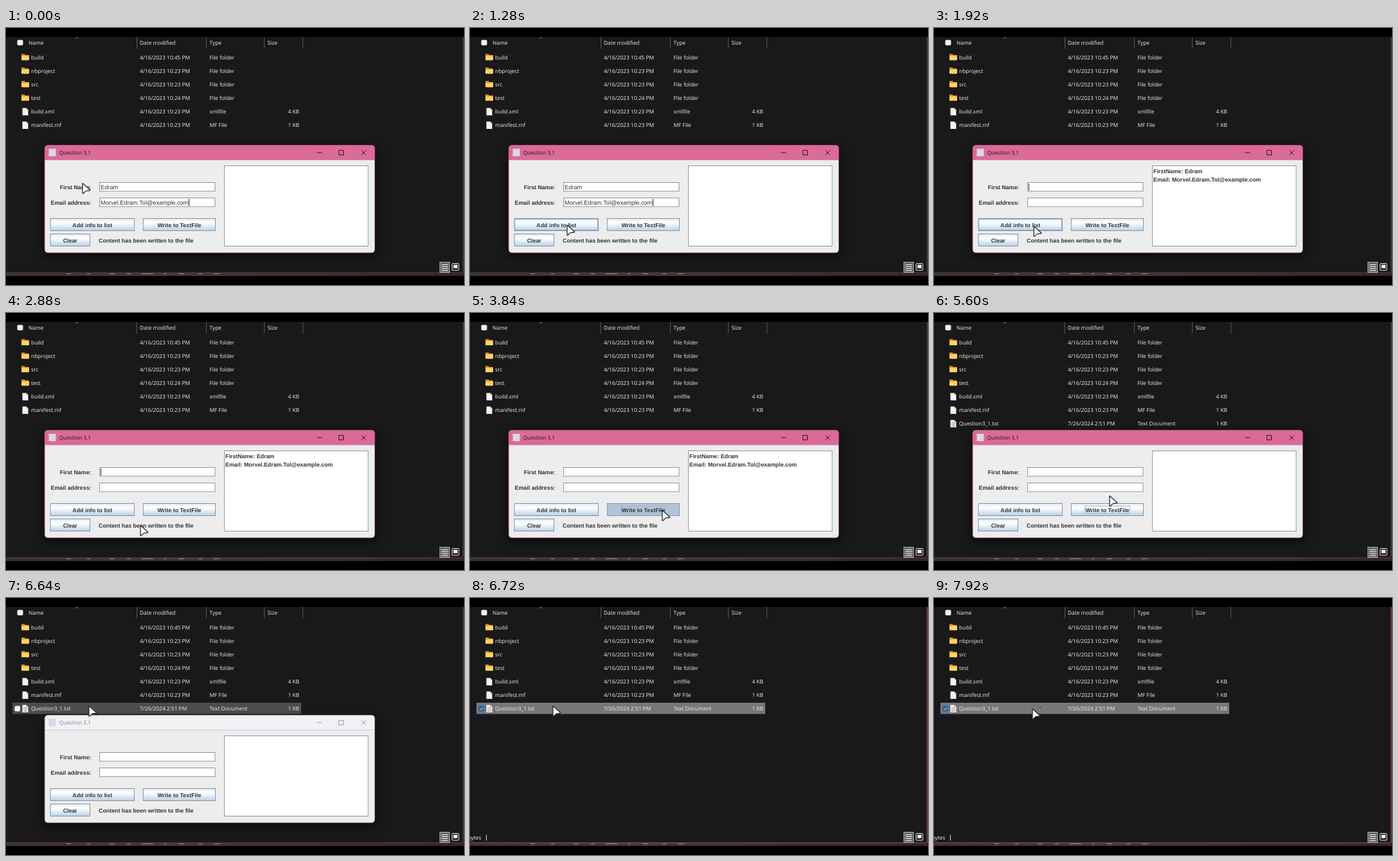
Animation, 712 px wide and 400 px high, one loop 8 s. Source, as an HTML page:

```html
<!DOCTYPE html>
<html lang="en">
<head>
<meta charset="utf-8">
<title>Question 3.1</title>
<style>
html, body { margin: 0; width: 100%; height: 100%; overflow: hidden; background: #000; }
svg { display: block; width: 712px; height: 400px; text-rendering: geometricPrecision; }
text { white-space: pre; }
.ui { font: 8.4px "Open Sans", "Noto Sans", sans-serif; fill: #f0f0f0; }
.bold { font: bold 8.85px "Liberation Sans", sans-serif; fill: #333; }
.plain { font: 9.25px "Liberation Sans", sans-serif; fill: #333; }
.end { text-anchor: end; }
.mid { text-anchor: middle; }
.line { fill: none; stroke: #8494a4; }
.field { fill: #fff; stroke: #8b959f; }
.glyph { fill: none; stroke: #2b1520; }
.frame { fill: #a04a6e; }
.bar { fill: #db6a98; }
.caption { fill: #26121c; }
.off { display: none; }
.inactive .frame { fill: #6a6a6c; }
.inactive .bar { fill: #f0f1f5; }
.inactive .caption { fill: #888b92; }
.inactive .glyph { stroke: #989aa2; }
</style>
</head>
<body>
<svg viewBox="0 0 712 400">
  <defs>
    <linearGradient id="metal" x2="0" y2="1">
      <stop offset="0" stop-color="#dde8f3"/>
      <stop offset=".3" stop-color="#fff"/>
      <stop offset=".5" stop-color="#f1f6fa"/>
      <stop offset="1" stop-color="#b8cfe5"/>
    </linearGradient>
    <linearGradient id="wall" x2="1" y2="0">
      <stop offset="0" stop-color="#3a2e38"/>
      <stop offset=".35" stop-color="#443541"/>
      <stop offset="1" stop-color="#33232f"/>
    </linearGradient>
    <filter id="soft" x="-10%" y="-20%" width="120%" height="140%"><feGaussianBlur stdDeviation="7"/></filter>
    <g id="folder">
      <path d="M24 -4.5q0-1 1-1h3.5l1.5 1.5h5q1 0 1 1v6q0 1-1 1h-10q-1 0-1-1z" fill="#d99a22"/>
      <rect x="24" y="-2.5" width="12" height="6.8" rx="1" fill="#ffd45f"/>
    </g>
    <path id="page" d="M25.5-5.5h6l3 3v8.5h-9z" fill="#f4f4f4"/>
    <path id="fold" d="M31.5-5.5v3h3z" fill="#b3b3b3"/>
    <path id="rules" d="M27-1.5h6M27 .5h6M27 2.5h6M27 4.5h6" stroke="#8d8d8d" stroke-width=".8"/>
  </defs>

  <rect y="14" width="712" height="372" fill="url(#wall)"/>
  <rect y="14" width="710" height="367" fill="#191919"/>
  <path id="edge" d="M0 381H708q2.5 0 2.5-2.5V14" fill="none"/>
  <path d="M94 382.5h7M126 382.5h5M161 382.5h8M188 382.5h6M211 382.5h18M245 382.5h4M268 382.5h9M299 382.5h6M323 382.5h9" stroke="#9b8b96"/>

  <g id="header">
    <rect x="17.5" y="18.5" width="9" height="8.5" rx="2" fill="#f2f2f2"/>
    <path d="M107.5 16.5l2.5-2.5 2.5 2.5" fill="none" stroke="#999" stroke-width=".8"/>
    <path d="M203.5 14V32M311.5 14V32M401.5 14V32M461.5 14V32" stroke="#555"/>
  </g>

  <g id="highlight">
    <rect id="rowFill" x="10" y="163" width="449" height="17.5"/>
    <rect id="box" x="13.5" y="168" width="8.5" height="8.5" rx="2"/>
    <path id="check" d="M15.5 172.3l1.7 1.7 3-3.4" fill="none" stroke="#fff"/>
  </g>
  <g id="rows"></g>

  <g id="status">
    <text class="ui end" x="17.5" y="375.8">1 item selected  68 bytes</text>
    <path d="M25.5 368.5v9" stroke="#ddd"/>
  </g>
  <rect x="674.5" y="364.5" width="15" height="16" fill="#666" stroke="#b0b0b0"/>
  <path d="M677 368.5h10M677 371.5h10M677 374.5h10M677 377.5h10" stroke="#f4f4f4"/>
  <rect x="693.5" y="366.5" width="10.5" height="10.5" rx="1" fill="#111" stroke="#f4f4f4"/>
  <rect x="695.5" y="368.5" width="6.5" height="5.5" fill="#f4f4f4"/>

  <g id="dialog">
    <rect x="58" y="188" width="518" height="168" rx="6" opacity=".55" filter="url(#soft)"/>
    <rect class="frame" x="59.7" y="182" width="514" height="168.3" rx="5.5"/>
    <path class="bar" d="M60.5 205.5V187.5q0-5 5-5H568q5 0 5 5V205.5z"/>
    <path d="M60.5 205.5H573V344.5q0 5-5 5H65.5q-5 0-5-5z" fill="#ededed"/>
    <rect x="66.5" y="188" width="11" height="11.5" fill="#d4dae4"/>
    <text class="ui caption" x="82.5" y="197.2">Question 3.1</text>
    <path class="glyph" d="M483.5 194h8M517.5 190.5h7v7h-7zM552.5 190.5l7 7M559.5 190.5l-7 7"/>
    <text class="bold end" x="132.5" y="251">First Name:</text>
    <text class="bold end" x="132.5" y="275">Email address:</text>
    <rect class="field" x="145.5" y="240.5" width="179.5" height="13.5"/>
    <rect class="field" x="145.5" y="264.5" width="179.5" height="13.5"/>
    <rect class="field" x="339.5" y="214.5" width="223.5" height="125"/>
    <g id="entry">
      <text class="plain" x="147" y="250.8">Edram</text>
      <text class="plain" x="147" y="274.8">Morvel.Edram.Tol@example.com</text>
    </g>
    <g id="list">
      <text class="bold" x="341" y="225.7">FirstName: Edram</text>
      <text class="bold" x="341" y="239.2">Email: Morvel.Edram.Tol@example.com</text>
    </g>
    <path id="emailCaret" d="M284.5 266v11" stroke="#222"/>
    <path id="nameCaret" d="M147.5 242v11" stroke="#222"/>
    <g id="buttons"></g>
    <text class="bold" x="144" y="333.8">Content has been written to the file</text>
  </g>

  <circle id="busy" cx="166" cy="170" r="1.5" fill="#1668c4"/>
  <path id="cursor" d="M0 .6V15.8q0 1.6 1.3.5L5.2 12.6 10.6 12q1.8-.2.5-1.4z" fill="#fff" stroke="#28282c" stroke-width="1.3" stroke-linejoin="round"/>
  <rect width="712" height="14"/>
  <rect y="386" width="712" height="14"/>
</svg>
<script>
const LOOP = 8000;
const $ = id => document.getElementById(id);
const label = (x, y, s, cls = 'ui') => `<text class="${cls}" x="${x}" y="${y}">${s}</text>`;
const use = id => `<use href="#${id}"/>`;

$('header').innerHTML += [[35, 'Name'], [208, 'Date modified'], [316.5, 'Type'], [406.5, 'Size']]
  .map(([x, s]) => label(x, 25.7, s)).join('');

const folderIcon = use('folder');
const fileIcon = use('page') + use('fold');
const files = [
  ['build', '4/16/2023 10:45 PM', 'File folder', '', folderIcon],
  ['nbproject', '4/16/2023 10:23 PM', 'File folder', '', folderIcon],
  ['src', '4/16/2023 10:23 PM', 'File folder', '', folderIcon],
  ['test', '4/16/2023 10:24 PM', 'File folder', '', folderIcon],
  ['build.xml', '4/16/2023 10:23 PM', 'xmlfile', '4 KB', fileIcon],
  ['manifest.mf', '4/16/2023 10:23 PM', 'MF File', '1 KB', fileIcon],
  ['Question3_1.txt', '7/26/2024 2:51 PM', 'Text Document', '1 KB', fileIcon + use('rules')]
];
$('rows').innerHTML = files.map(([name, date, type, size, icon], i) =>
  `<g transform="translate(0 ${46 + 21 * i})">${icon}` + label(39, 3.1, name) + label(208, 3.1, date) +
  label(316.5, 3.1, type) + label(456, 3.1, size, 'ui end') + '</g>').join('');
const newFile = $('rows').lastElementChild;

const button = (id, x, y, w, h, s) => `<g id="${id}">
  <rect class="line face" x="${x}" y="${y}" width="${w}" height="${h}"/>
  <rect class="hover" x="${x + 1}" y="${y + 1}" width="${w - 2}" height="${h - 2}" fill="none" stroke="#8fadcc"/>
  <rect class="focus" x="${x + w / 2 - 35}" y="${y + 4}" width="70" height="12" fill="none" stroke="#9fb6cd"/>
  ${label(x + w / 2, y + h / 2 + 3.6, s, 'bold mid')}</g>`;
$('buttons').innerHTML =
  button('add', 69, 296.5, 130.5, 19, 'Add info to list') +
  button('write', 213.3, 296.5, 112.2, 19, 'Write to TextFile') +
  button('clear', 69, 320.5, 61.5, 19, 'Clear');

const show = (el, on) => el.classList.toggle('off', !on);
const during = (t, from, to) => t >= from && t < to;

function setButton(id, hover, pressed, focus) {
  const part = name => $(id).querySelector('.' + name);
  part('face').style.fill = pressed ? '#b1c4d8' : 'url(#metal)';
  show(part('hover'), hover && !pressed);
  show(part('focus'), focus);
}

// time, x, y of the pointer tip
const path = [
  [0, 119, 241], [400, 121, 245], [1120, 151, 306], [1760, 151, 306], [2720, 209, 330],
  [2960, 209, 330], [3600, 299, 306.5], [4080, 299, 306.5], [4720, 285, 293], [5440, 273, 284],
  [5680, 273, 284], [6480, 129, 167.5], [6800, 129, 167.5], [7520, 153, 172], [LOOP, 153, 172]
];
function pointerAt(t) {
  const i = path.findIndex(p => p[0] > t);
  const [t0, x0, y0] = path[i - 1], [t1, x1, y1] = path[i];
  const u = (t - t0) / (t1 - t0), e = u * u * (3 - 2 * u);
  return [x0 + (x1 - x0) * e, y0 + (y1 - y0) * e];
}

const ADDED = 1600, PRESS = 3680, WRITTEN = 3920, SAVED = 4960, CLICK = 6640, SELECTED = 6720;

function draw(t) {
  const [x, y] = pointerAt(t);
  const over = (l, r) => x > l && x < r && y > 296 && y < 316;
  const selected = t >= SELECTED;
  $('cursor').setAttribute('transform', `translate(${x} ${y})`);

  show($('entry'), t < ADDED);
  show($('list'), during(t, ADDED, WRITTEN));
  show($('emailCaret'), t < 1440 && (t + 180) % 1000 < 500);
  show($('nameCaret'), during(t, ADDED, PRESS) && (t - ADDED) % 1000 < 500);
  setButton('add', over(69, 200), during(t, 1440, ADDED), during(t, 1440, ADDED));
  setButton('write', over(213, 326), during(t, PRESS, WRITTEN), during(t, PRESS, CLICK));
  setButton('clear', false, false, false);

  show(newFile, t >= SAVED);
  show($('highlight'), t > 6000 && y < 181);
  $('rowFill').setAttribute('fill', selected ? '#777' : '#4d4d4d');
  $('box').setAttribute('fill', selected ? '#1762b5' : '#f4f4f4');
  show($('check'), selected);
  show($('status'), selected);
  $('edge').setAttribute('stroke', selected ? '#a34c78' : '#5d4452');
  $('dialog').classList.toggle('inactive', t >= CLICK);
  show($('dialog'), !selected);
  show($('busy'), t >= 7840);
}

const start = performance.now();
function tick() {
  draw((performance.now() - start) % LOOP);
  requestAnimationFrame(tick);
}
tick();
</script>
</body>
</html>
```
